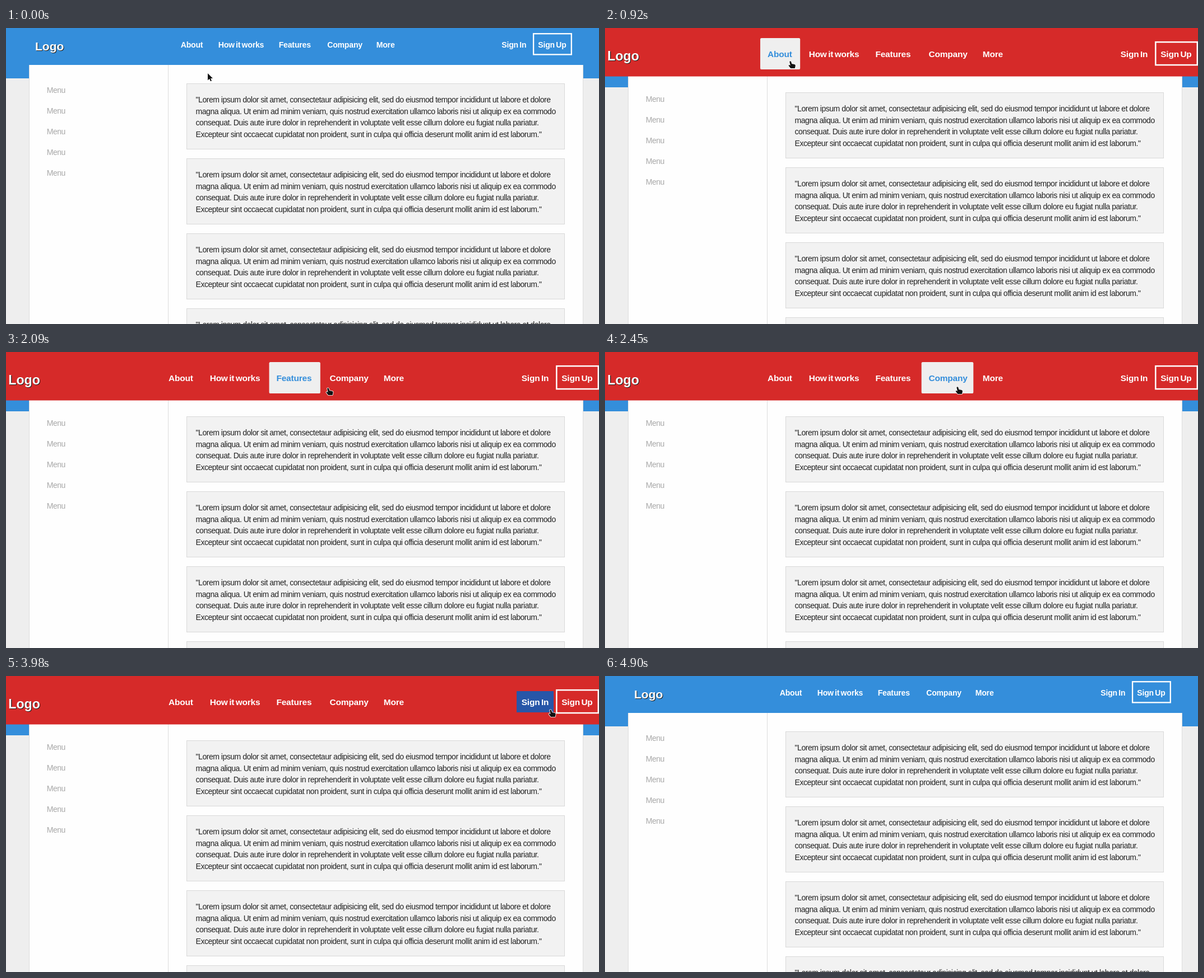
An HTML page with a canvas for the animation above (5.75 s loop, 1058 by 529 pixels).

```html
<!DOCTYPE html>
<html lang="en">
<head>
<meta charset="utf-8">
<title>Zooming header</title>
<style>
html, body { margin: 0; width: 100%; height: 100%; overflow: hidden; background: #eee; }
canvas { display: block; }
</style>
</head>
<body>
<canvas id="stage" width="1058" height="529"></canvas>
<script>
const ctx = document.getElementById('stage').getContext('2d');
const W = 1058, H = 529, LOOP = 5750, PUSH = 16.4;
const FAMILY = '"Liberation Sans", Arial, sans-serif';
const BLUE = [52, 142, 219], RED = [214, 42, 41], WHITE = [255, 255, 255], NAVY = [39, 86, 168];

const LOREM = [
  '"Lorem ipsum dolor sit amet, consectetaur adipisicing elit, sed do eiusmod tempor incididunt ut labore et dolore',
  'magna aliqua. Ut enim ad minim veniam, quis nostrud exercitation ullamco laboris nisi ut aliquip ex ea commodo',
  'consequat. Duis aute irure dolor in reprehenderit in voluptate velit esse cillum dolore eu fugiat nulla pariatur.',
  'Excepteur sint occaecat cupidatat non proident, sunt in culpa qui officia deserunt mollit anim id est laborum."'
];

// Header links: text position, hover plate and hover period
const NAV = [
  { label: 'About', x: 312.5, w: 64.7, from: 550, to: 1030 },
  { label: 'How it works', x: 379.5, w: 104.7, from: 1040, to: 1700 },
  { label: 'Features', x: 487.5, w: 83, from: 1710, to: 2220 },
  { label: 'Company', x: 574, w: 84.2, from: 2230, to: 2610 },
  { label: 'More', x: 661.5, w: 56, from: 2620, to: 2790 }
];
const SIGN_IN = { label: 'Sign In', x: 885, from: 3370, to: 4020 };
const SIGN_UP = { label: 'Sign Up', x: 950, from: 4030, to: 4570 };
const LINKS = [...NAV, SIGN_IN, SIGN_UP];

// Pointer path: time, x, y of the tip
const PATH = [
  [0, 360, 81], [50, 358, 79], [410, 346, 77], [530, 346, 77], [630, 331, 59],
  [920, 331, 59], [1480, 440, 60], [1520, 442, 60], [1680, 476, 69], [2090, 575, 64],
  [2150, 575, 64], [2450, 629, 62], [2690, 706, 62], [2770, 706, 62], [3090, 883, 64],
  [3280, 916, 66], [3360, 916, 66], [3440, 930, 62], [3940, 972, 60], [3980, 972, 60],
  [4380, 1026, 56], [4540, 1026, 56], [4640, 1062, 54]
];

const clamp = v => Math.max(0, Math.min(1, v));
const lerp = (a, b, p) => a + (b - a) * p;
const mix = (a, b, p) => `rgb(${a.map((v, i) => Math.round(lerp(v, b[i], p)))})`;

// Same curve as the CSS "ease" keyword
function ease(x) {
  const bezier = (a, b, u) => 3 * a * u * (1 - u) ** 2 + 3 * b * u * u * (1 - u) + u ** 3;
  let lo = 0, hi = 1;
  for (let i = 0; i < 18; i++) {
    const mid = (lo + hi) / 2;
    if (bezier(.25, .25, mid) < x) lo = mid; else hi = mid;
  }
  return bezier(.1, 1, lo);
}

const zoomAt = t => ease(clamp((t - 30) / 380)) - ease(clamp((t - 4540) / 360));
const hoverAt = (link, t) => clamp((t - link.from) / 80) * (1 - clamp((t - link.to) / 80));

function rect(x, y, w, h, fill) {
  ctx.fillStyle = fill;
  ctx.fillRect(x, y, w, h);
}

function text(str, x, y, fill, font, letter = 0, word = 0) {
  ctx.font = `${font} ${FAMILY}`;
  ctx.letterSpacing = letter + 'px';
  ctx.wordSpacing = word + 'px';
  ctx.fillStyle = fill;
  ctx.fillText(str, x, y);
}

const linkText = (link, fill) => text(link.label, link.x - .8, 34.5, fill, 'bold 14px', -.15, -1.5);

function drawPage(shift) {
  rect(0, 0, W, H, '#eee');
  rect(0, 0, W, 90 + shift, mix(BLUE, BLUE, 0));
  rect(41, 66 + shift, 989, H, '#ddd');
  rect(42, 66 + shift, 987, H, '#fefefe');
  rect(289, 66 + shift, 1, H, '#ddd');

  for (let i = 0; i < 5; i++) {
    text('Menu', 72.8, Math.round(116 + i * 37 + shift), '#a9a9a9', '14px', -.48);
  }
  for (let i = 0; i < 4; i++) {
    const top = Math.round(99.2 + i * 133.9 + shift);
    rect(322, top, 675, 118, '#d8d8d8');
    rect(323, top + 1, 673, 116, '#f2f2f2');
    LOREM.forEach((line, k) =>
      text(line, 338.6, top + Math.round(33.7 + k * 20.8), '#222', '14px', -.48));
  }
}

function drawHeader(t, zoom) {
  const pad = PUSH * zoom, scale = 1 + .1 * zoom, middle = (66 + pad) / 2;
  ctx.save();
  ctx.translate(W / 2, middle);
  ctx.scale(scale, scale);
  ctx.translate(-W / 2, -middle);
  rect(0, 0, W, 66 + pad, mix(BLUE, RED, zoom));
  ctx.translate(0, pad);

  text('Logo', 53, 41, '#222', 'bold 21px');
  text('Logo', 52, 40, '#fff', 'bold 21px');

  for (const link of NAV) {
    const hover = hoverAt(link, t);
    if (hover > 0) {
      ctx.globalAlpha = hover;
      ctx.fillStyle = '#efefef';
      ctx.beginPath();
      ctx.roundRect(link.x - 12.6, 3.7, link.w, 51, 2);
      ctx.fill();
      ctx.globalAlpha = 1;
    }
    linkText(link, mix(WHITE, BLUE, hover));
  }

  ctx.globalAlpha = hoverAt(SIGN_IN, t);
  rect(876.3, 11.9, 60, 34.5, mix(NAVY, NAVY, 0));
  ctx.globalAlpha = hoverAt(SIGN_UP, t);
  rect(941, 10, 68, 37, mix(NAVY, NAVY, 0));
  ctx.globalAlpha = 1;
  ctx.strokeStyle = '#fff';
  ctx.lineWidth = 2.3;
  ctx.strokeRect(941.1, 10.2, 67.7, 37.2);
  linkText(SIGN_IN, '#fff');
  linkText(SIGN_UP, '#fff');
  ctx.restore();
}

const ARROW = new Path2D('M0 0V12.5L3 9.8L5 14.2L7 13.3L5.1 9H9Z');
const HAND = new Path2D('M-2 1Q0-.5 1 1.5L2 5L7 6Q9 6.5 8.5 9L7.5 13H0L-3.5 8.5Q-4 7-2.5 7L-.5 8Z');

function drawPointer(t) {
  const next = PATH.findIndex(p => p[0] > t);
  if (next < 1) return;
  const [t0, x0, y0] = PATH[next - 1], [t1, x1, y1] = PATH[next];
  const p = (t - t0) / (t1 - t0);
  const shape = LINKS.some(link => t >= link.from && t <= link.to) ? HAND : ARROW;
  ctx.save();
  ctx.translate(lerp(x0, x1, p), lerp(y0, y1, p));
  ctx.lineJoin = 'round';
  ctx.lineWidth = 1.6;
  ctx.strokeStyle = '#fff';
  ctx.stroke(shape);
  ctx.fillStyle = '#111';
  ctx.fill(shape);
  ctx.restore();
}

function draw(now) {
  const t = now % LOOP, zoom = zoomAt(t);
  drawPage(Math.round(PUSH * zoom));
  drawHeader(t, zoom);
  drawPointer(t);
}

const start = performance.now();
function tick() {
  draw(performance.now() - start);
  requestAnimationFrame(tick);
}
tick();
</script>
</body>
</html>
```
